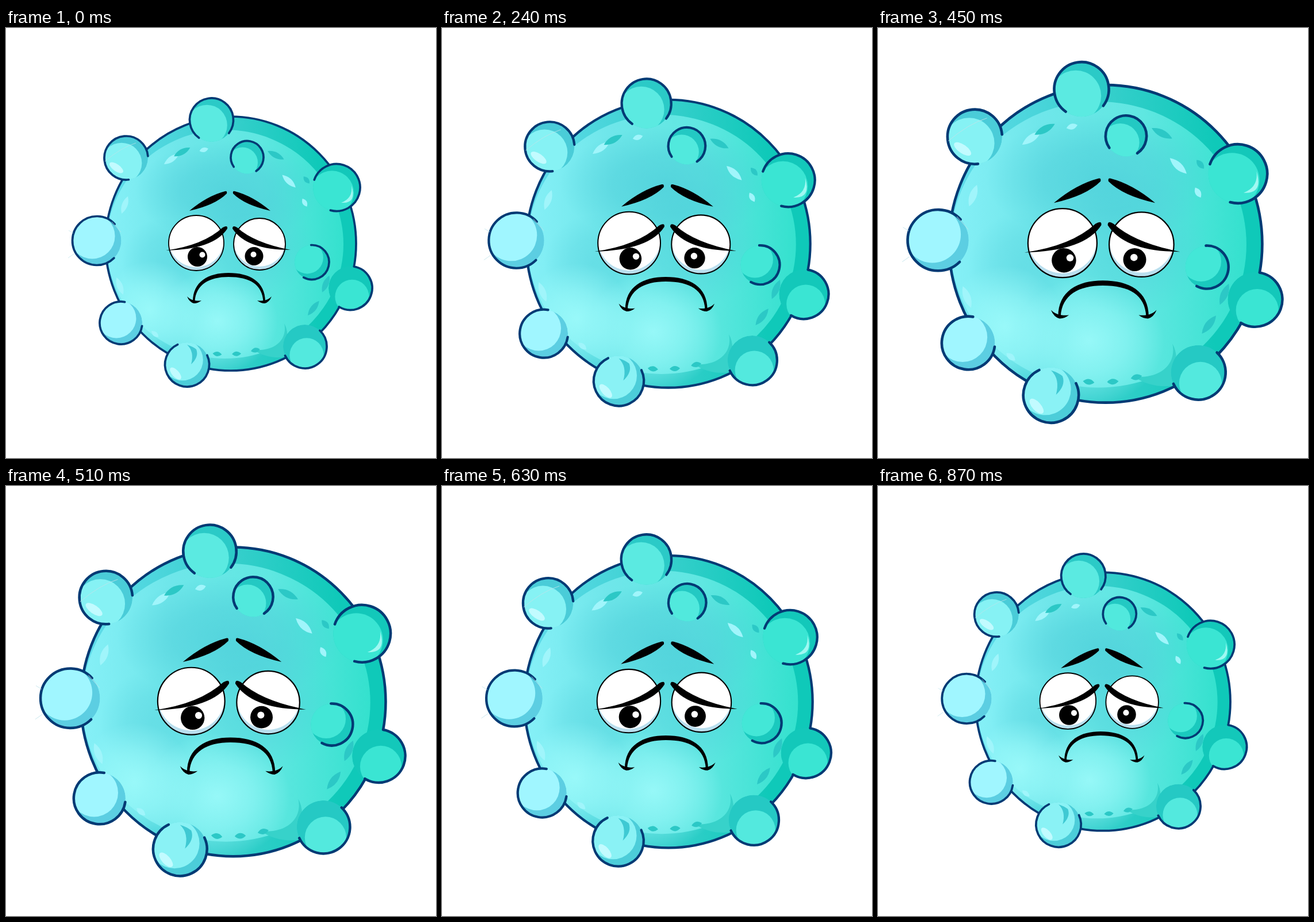
An HTML page that plays this animation: 748 px wide and 748 px high, repeating every 900 ms.

```html
<!DOCTYPE html>
<html lang="en">
<head>
<meta charset="utf-8">
<title>Sad germ</title>
<style>
  html, body { margin: 0; width: 100%; height: 100%; overflow: hidden; background: #fff; }
  svg { display: block; width: 748px; height: 748px; }
  .ink { fill: none; stroke: #033a74; stroke-width: 3.7; stroke-linecap: round; }
</style>
</head>
<body>
<svg viewBox="0 0 748 748">
  <defs>
    <linearGradient id="rim">
      <stop offset="0" stop-color="#62dcec"/>
      <stop offset=".5" stop-color="#36cfcc"/>
      <stop offset=".85" stop-color="#0fc9b9"/>
    </linearGradient>
    <linearGradient id="skin">
      <stop offset="0" stop-color="#86f0f7"/>
      <stop offset=".3" stop-color="#6fe6ea"/>
      <stop offset=".65" stop-color="#5fe7e1"/>
      <stop offset="1" stop-color="#34e1ce"/>
    </linearGradient>
    <radialGradient id="dim">
      <stop offset="0" stop-color="#4bcbd8" stop-opacity=".65"/>
      <stop offset=".5" stop-color="#4bcbd8" stop-opacity=".45"/>
      <stop offset="1" stop-color="#4bcbd8" stop-opacity="0"/>
    </radialGradient>
    <radialGradient id="glow">
      <stop offset="0" stop-color="#9efbfb" stop-opacity=".85"/>
      <stop offset=".5" stop-color="#9efbfb" stop-opacity=".5"/>
      <stop offset="1" stop-color="#9efbfb" stop-opacity="0"/>
    </radialGradient>
    <clipPath id="inside"><ellipse id="body" cx="391" cy="375" rx="218" ry="221"/></clipPath>
    <clipPath id="leftEye"><circle id="leftBall" cx="331" cy="374" r="48"/></clipPath>
    <clipPath id="rightEye"><circle id="rightBall" cx="441" cy="376" r="45"/></clipPath>
  </defs>
  <g id="germ">
    <g clip-path="url(#inside)">
      <use href="#body" fill="url(#rim)"/>
      <ellipse cx="381" cy="376" rx="206" ry="199" fill="url(#skin)"/>
      <ellipse cx="385" cy="285" rx="160" ry="90" fill="url(#dim)"/>
      <ellipse cx="275" cy="405" rx="75" ry="75" fill="url(#dim)" opacity=".5"/>
      <ellipse cx="425" cy="375" rx="110" ry="100" fill="url(#dim)" opacity=".7"/>
      <ellipse cx="250" cy="490" rx="85" ry="85" fill="url(#glow)"/>
      <ellipse cx="368" cy="510" rx="105" ry="90" fill="url(#glow)"/>
      <path d="M484 514C490 540 470 563 431 560Q455 577 490 572L555 530Q515 528 488 546Q492 528 484 514Z" fill="#37d2ca"/>
    </g>
    <use href="#body" class="ink"/>
    <g id="flecks"></g>
    <g id="bumps"></g>

    <g fill="#c2fbff">
      <ellipse cx="192" cy="243" rx="14" ry="6" transform="rotate(35 192 243)"/>
      <ellipse cx="295" cy="601" rx="13" ry="6" transform="rotate(48 295 601)"/>
    </g>
    <path d="M315 551Q328 563 322 585Q336 572 331 559Q325 554 315 551Z" fill="#3fc9d3"/>
    <path d="M601 274Q604 296 583 304Q611 306 601 274Z" fill="#a0f8f2"/>
    <g fill="none" stroke="#bfe3ea" stroke-width=".7">
      <path d="M109 352l8 5M108 400l10-7M184 337l16 18M172 232Q200 208 226 200"/>
    </g>

    <g clip-path="url(#leftEye)">
      <use href="#leftBall" fill="#b9dfee"/>
      <use href="#leftBall" y="-6" fill="#fff"/>
      <circle cx="333" cy="398" r="17"/>
      <path d="M278 387Q345 379 384 347L330 325L278 350Z" fill="#fff"/>
    </g>
    <g clip-path="url(#rightEye)">
      <use href="#rightBall" fill="#b9dfee"/>
      <use href="#rightBall" y="-6" fill="#fff"/>
      <circle cx="431.500" cy="397" r="16"/>
      <path d="M394 346Q430 380 494 386L490 330H394Z" fill="#fff"/>
    </g>
    <g fill="#fff"><circle cx="341.500" cy="394.500" r="5"/><circle cx="430.500" cy="394" r="5"/></g>
    <g fill="none" stroke="#000" stroke-width="1.800">
      <use href="#leftBall"/><use href="#rightBall"/>
    </g>
    <path d="M278 387Q343 378 377 347Q386 342 385 349Q362 385 278 387Z"/>
    <path d="M495 386Q432 374 402 347Q394 342 394 349Q418 386 495 386Z"/>
    <path id="brow" d="M319 318Q350 292 381 284Q385 283 384 288Q364 308 319 318Z"/>
    <use href="#brow" transform="matrix(-1 0 0 1 779 0)"/>
    <path d="M325 476C325 441 352 426 387 426C424 426 451 441 451 476H447.500C446 446 424 433 387 433C354 433 330 446 328.500 476Z"/>
    <path id="corner" d="M315 467Q321 473 329 474Q335 475 340 474Q334 479 327 479Q319 477 315 467Z"/>
    <use href="#corner" transform="matrix(-1 0 0 1 777 0)"/>
  </g>
</svg>
<script>
  const CX = 391, CY = 375, RAD = Math.PI / 180;
  const byId = id => document.getElementById(id);
  const cos = deg => Math.cos(deg * RAD), sin = deg => Math.sin(deg * RAD);
  const point = (x, y, r, deg) => `${x + r * cos(deg)} ${y + r * sin(deg)}`;

  // Leaf marks lie along an off-centre ring; long and short ones alternate
  const flecks = (angles, fill, ring) => angles.map((deg, i) => {
    const long = i % 2 ? 8 : 16, wide = i % 2 ? 4 : 5;
    return `<path transform="translate(${point(CX, CY, ring(deg), deg)}) rotate(${deg + 90})" fill="${fill}"
      d="M${-long} 0Q0 ${-wide * 2} ${long} 0Q0 ${wide * 2} ${-long} 0Z"/>`;
  }).join('');
  byId('flecks').innerHTML =
    flecks([-125, -106, -47, -29, -160, 177, 159, 130], '#a0f5fb', deg => 177 + 30 * cos(deg - 150)) +
    flecks([-63, -40, 23, 87, 38, 97, -118, 77], '#2cc8c6', deg => 184 - 12 * cos(deg + 45));

  const mix = (a, b, t) => `rgb(${a.map((v, i) => v + (b[i] - v) * t)})`;

  // The outline opens towards the body centre, wider in the shadow at lower right
  function bump([x, y, r], i) {
    const deg = Math.atan2(y - CY, x - CX) / RAD;
    const shadow = Math.max(0, cos(deg - 37)) ** 3;
    const gap = 44 + 40 * shadow;
    const from = deg + 180 + gap, to = deg + 540 - gap;
    const deep = shadow > 0.8;
    const dx = deep ? 3 : -8, dy = deep ? 15 : y < 300 ? 9 : -8;
    const tint = Math.min(1, Math.max(0, (x - 158) / 400 + (CY - y) / 1200));
    return `
      <clipPath id="bump${i}"><circle id="ball${i}" cx="${x}" cy="${y}" r="${r}"/></clipPath>
      <g clip-path="url(#bump${i})">
        <use href="#ball${i}" fill="${mix([92, 206, 226], [19, 200, 186], tint)}"/>
        <circle cx="${x + dx}" cy="${y + dy}" r="${r * (deep ? 0.78 : 0.93)}"
          fill="${mix([160, 246, 255], [58, 229, 211], tint)}"/>
      </g>
      <path class="ink" d="M${point(x, y, r, from)}A${r} ${r} 0 ${+(gap < 90)} 1 ${point(x, y, r, to)}"/>`;
  }
  byId('bumps').innerHTML = [
    [357.5, 160, 38], [209, 226, 38], [158, 370, 42.5], [200, 513, 37], [315, 585.5, 38.5],
    [520, 554, 38], [599, 452.5, 38], [575, 277.5, 41], [419.5, 225, 28.5], [532, 407.5, 30]
  ].map(bump).join('');

  // Steady swell to 125 % and back, in 30 ms steps
  const LOOP = 900, STEP = 30, PIVOT = [371.4, 373.3];
  const germ = byId('germ');
  function draw(now) {
    const t = Math.floor(now % LOOP / STEP) * STEP;
    const scale = 1.25 - 0.25 * Math.abs(t / (LOOP / 2) - 1);
    germ.setAttribute('transform', `translate(${PIVOT}) scale(${scale}) translate(${PIVOT.map(v => -v)})`);
    requestAnimationFrame(draw);
  }
  draw(performance.now());
</script>
</body>
</html>
```
